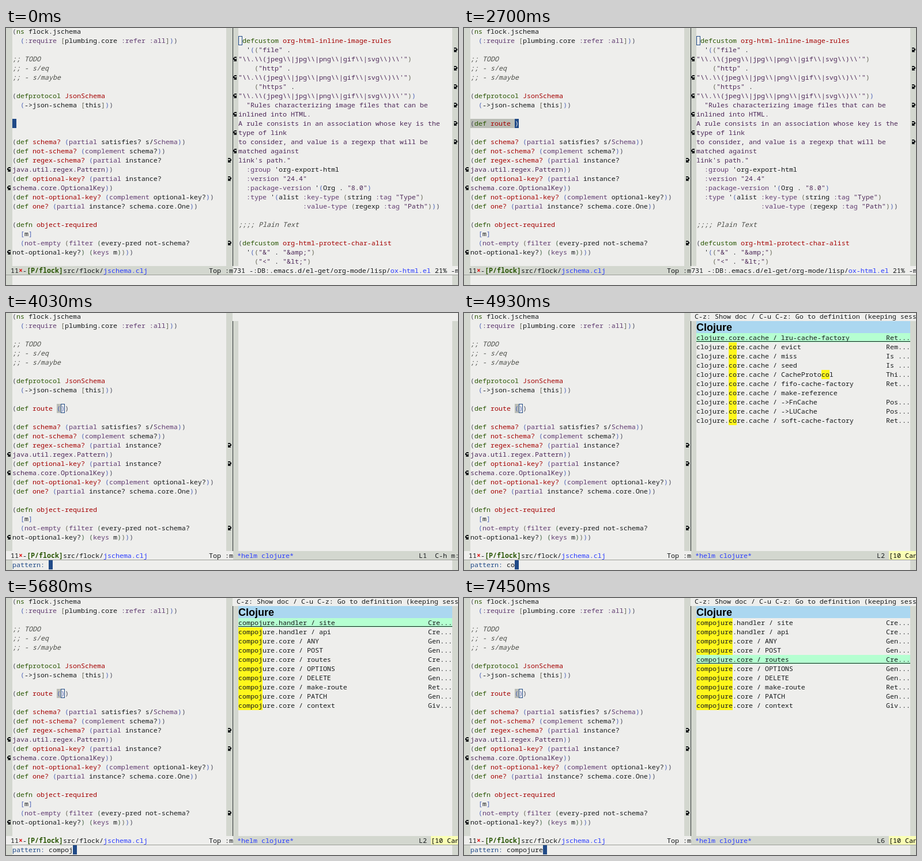
An HTML page that plays this animation: 784x447 px, repeating every 8000 ms.

```html
<!DOCTYPE html>
<html lang="en">
<head>
<meta charset="utf-8">
<title>Editor completion</title>
<style>
  html, body { margin: 0; width: 100%; height: 100%; overflow: hidden; }
  body { position: relative; background: #eeeeec; color: #16191b; }
  body, pre { font: 500 11.6667px/16px "Noto Sans Mono", "DejaVu Sans Mono", monospace; }
  pre { margin: 0; }
  div, pre, svg { position: absolute; white-space: pre; }
  .fringe { background: #d3d7cf; top: 0; height: 447px; }
  .split { left: 393px; width: 1px; height: 414px; background: #2e3436; }
  .bar { top: 414px; height: 16px; background: #eeeeec; overflow: hidden; }
  .bar.active { background: #d3d7cf; }
  .bar::after { content: ""; position: absolute; inset: 0; box-shadow: inset 0 -1px #9a9d97; }
  .cursor { width: 7px; height: 16px; background: #204a87; color: #eeeeec; }
  .hollow { box-sizing: border-box; background: #eeeeec; border: 1px solid #204a87; color: #4f65b8; line-height: 14px; text-indent: -1px; }
  .region { height: 16px; background: #babdb6; }
  .source { left: 403px; top: 14px; width: 371px; height: 21px; background: #abd7f0; color: #000;
            font: bold 18px/22px "Liberation Sans", Arial, sans-serif; }
  .item { left: 403px; width: 371px; height: 16px; }
  .item i { display: inline-block; height: 16px; vertical-align: top; font-style: normal; background: #fff71c; }
  .item span { position: absolute; left: 329px; }
  .on { background: #b5ffd1; box-shadow: inset 0 -1px #b5ffd1, inset 0 -2px #16191b; }
  .count { left: 343px; width: 60px; background: #faffb5; color: #000; }
  .k { color: #2a5604; }
  .f { color: #a40000; }
  .b { color: #5f3a70; }
  .s { color: #4c2858; }
  .c { color: #4c4e49; font-style: italic; }
  .p { color: #204a87; }
  .n { color: #2b3cff; }
  .g { color: #2a5604; font-weight: 600; }
  .x { color: #e01010; font-weight: bold; }
  .d1 { color: #4c4d5c; }
  .d2 { color: #4f65b8; }
  .d3 { color: #666758; }
  .d4 { color: #466646; }
  .d5 { color: #664a4a; }
</style>
</head>
<body>
<div class="fringe" style="left:0;width:11px"></div>
<div class="fringe" style="left:382px;width:11px;height:414px"></div>
<div class="fringe" id="inner" style="left:394px;width:9px;height:414px"></div>
<div class="fringe" id="outer" style="left:774px;width:10px"></div>
<div class="split" id="split"></div>
<pre id="left" style="left:11px;top:-2px"></pre>
<pre id="right" style="left:403px;top:-2px"></pre>
<div id="marks"></div>
<div id="point" class="cursor hollow" style="left:403px;top:14px"></div>
<div id="edit" style="left:11px;top:158px"></div>
<div id="helm"></div>
<div class="bar" id="bar1" style="left:0;width:394px"></div>
<div class="bar" id="bar2" style="left:394px;width:390px"></div>
<div id="mini" style="left:11px;top:430px"></div>

<script>
const LOOP = 8000, CELL = 7, ROW = 16;
const $ = id => document.getElementById(id);

// {kword} gives a word the class k; brackets are coloured by depth.
const leftCode = String.raw`({kns} flock.jschema
  ({b:require} [plumbing.core {b:refer} {b:all}]))

{c;; TODO}
{c;; - s/eq}
{c;; - s/maybe}

({kdefprotocol} {fJsonSchema}
  (->json-schema [this]))



({kdef} {fschema?} ({bpartial} satisfies? s/{bSchema}))
({kdef} {fnot-schema?} ({bcomplement} schema?))
({kdef} {fregex-schema?} ({bpartial} instance?
{sjava.util.regex.Pattern}))
({kdef} {foptional-key?} ({bpartial} instance?
{sschema.core.OptionalKey}))
({kdef} {fnot-optional-key?} ({bcomplement} optional-key?))
({kdef} {fone?} ({bpartial} instance? schema.core.One))

({kdefn} {fobject-required}
  [m]
  ({bnot-empty} ({bfilter} (every-pred not-schema?
not-optional-key?) ({bkeys} m))))`;

const types = String.raw`{s"\\.\\(jpeg\\|jpg\\|png\\|gif\\|svg\\)\\'"}`;
const rightCode = String.raw`
({kdefcustom} {forg-html-inline-image-rules}
  '(({s"file"} .
${types})
    ({s"http"} .
${types})
    ({s"https"} .
${types}))
  {s"Rules characterizing image files that can be}
{sinlined into HTML.}
{sA rule consists in an association whose key is the}
{stype of link}
{sto consider, and value is a regexp that will be}
{smatched against}
{slink's path."}
  {b:group} 'org-export-html
  {b:version} {s"24.4"}
  {b:package-version} '(Org . {s"8.0"})
  {b:type} '(alist {b:key-type} (string {b:tag} {s"Type"})
                {b:value-type} (regexp {b:tag} {s"Path"})))

{c;;;; Plain Text}

({kdefcustom} {forg-html-protect-char-alist}
  '(({s"&"} . {s"&amp;"})
    ({s"<"} . {s"&lt;"})`;

const esc = s => s.replace(/&/g, "&amp;").replace(/</g, "&lt;");

function paint(code) {
  let depth = 0;
  return code.replace(/\{(\w)([^}]*)\}|[()[\]]/g, (m, cls, text) => {
    if (cls) return `<span class="${cls}">${esc(text)}</span>`;
    const d = "([".includes(m) ? ++depth : depth--;
    return `<span class="d${d}">${m}</span>`;
  });
}

// Curly arrows beside wrapped lines
function arrow(x, row, flip) {
  return `<svg width="8" height="8" style="left:${x}px;top:${row * ROW + 2}px">
    <path fill="#16191b" ${flip ? 'transform="matrix(-1 0 0 1 8 0)"' : ""}
    d="M2 0H6V2H2V3H3V4H5V3H6V8H1V7H2V6H1V5H0V2H1V1H2Z"/></svg>`;
}
const wraps = (rows, lx, rx) =>
  rows.map(r => arrow(rx, r, true) + arrow(lx, r + 1, false)).join("");
const leftMarks = wraps([14, 16, 23], 2, 383);
const rightMarks = wraps([2, 4, 6, 8, 10, 12], 394, 775);

const cacheItems = [
  ["lru-cache-factory", "Ret"], ["evict", "Rem"], ["miss", "Is "], ["seed", "Is "],
  ["CacheProtocol", "Thi"], ["fifo-cache-factory", "Ret"], ["make-reference", ""],
  ["->FnCache", "Pos"], ["->LUCache", "Pos"], ["soft-cache-factory", "Ret"]
].map(([name, doc]) => ["clojure.core.cache / " + name, doc]);

const routeItems = [
  ["handler / site", "Cre"], ["handler / api", "Cre"], ["core / ANY", "Gen"],
  ["core / POST", "Gen"], ["core / routes", "Cre"], ["core / OPTIONS", "Gen"],
  ["core / DELETE", "Gen"], ["core / make-route", "Ret"], ["core / PATCH", "Gen"],
  ["core / context", "Giv"]
].map(([name, doc]) => ["compojure." + name, doc]);

// Timelines: [start in ms, value]
const typed = [[0, null], [600, ""], [1350, "d"], [1500, "def"], [1800, "def "],
  [1950, "def r"], [2100, "def ro"], [2250, "def rou"], [2400, "def route"],
  [2700, "def route "], [3140, "def route ()"]];
const inputLen = [[4030, 0], [4780, 1], [4930, 2], [5080, 3], [5230, 4], [5380, 5],
  [5680, 6], [5820, 7], [5970, 8], [6260, 9]];
const matchLen = [[0, 0], [4930, 2], [5080, 3], [5230, 4], [5530, 5],
  [5680, 6], [5820, 7], [5970, 8], [6410, 9]];
const picked = [[0, 0], [7010, 1], [7150, 2], [7300, 3], [7450, 4]];

function at(line, t) {
  let value;
  for (const [start, v] of line) if (start <= t) value = v;
  return value;
}

function put(id, html) {
  const el = $(id);
  if (el.shown !== html) el.innerHTML = el.shown = html;
}

function editHtml(text, hollow) {
  if (text === null) return '<div class="cursor"></div>';
  const nested = text.endsWith("()");
  const col = text.length + (nested ? 0 : 1);
  const from = nested ? col - 1 : 0;
  const code = text.replace(/^def/, "{kdef}").replace(/ (\w+)/, " {f$1}");
  return `<div class="region" style="left:${from * CELL}px;width:${(col - from) * CELL}px"></div>` +
    `<div>${paint(`(${code})`)}</div>` +
    `<div class="cursor${hollow ? " hollow" : ""}" style="left:${col * CELL}px">)</div>`;
}

function helmHtml(query, sel) {
  if (!query) return "";
  const items = query.length < 3 ? cacheItems : routeItems;
  const rows = items.map(([name, doc], i) => {
    const on = i === sel;
    const label = on ? name : name.split(query).join(`<i>${query}</i>`);
    return `<div class="item${on ? " on" : ""}" style="top:${35 + i * ROW}px">` +
      `${label}<span>${doc && doc + "..."}</span></div>`;
  });
  return '<div style="left:400px;top:-2px">C-z: Show doc / C-u C-z: Go to definition (keeping session)</div>' +
    '<div class="source">Clojure</div>' + rows.join("");
}

function helmBar(query, sel) {
  const tail = query
    ? '<div class="count">[10 Candidate(s)]</div>'
    : '<div style="left:350px">C-h m:Help</div>';
  return `<div class="n" style="left:7px">*helm clojure*</div>` +
    `<div style="left:322px">L${query ? sel + 2 : 1}</div>${tail}`;
}

const fileBar = '731 -:DB:.emacs.d/el-get/org-mode/lisp/<span class="n">ox-html.el</span> 21% -m';

function draw(t) {
  const helm = t >= 4030;
  const query = "compojure".slice(0, at(matchLen, t));
  const sel = at(picked, t);
  const top = helm ? "14px" : "0";

  put("edit", editHtml(at(typed, t), t >= 3740));
  put("marks", leftMarks + (helm ? "" : rightMarks));
  put("helm", helmHtml(query, sel));
  put("bar2", helm ? helmBar(query, sel) : fileBar);
  $("bar1").classList.toggle("active", !helm);
  $("bar2").classList.toggle("active", helm);
  for (const id of ["right", "point"]) $(id).style.display = helm ? "none" : "";
  for (const id of ["inner", "outer", "split"]) $(id).style.top = top;
  for (const id of ["inner", "split"]) $(id).style.height = helm ? "400px" : "414px";

  const n = at(inputLen, t);
  put("mini", helm
    ? `<span class="p">pattern: </span>${"compojure".slice(0, n)}` +
      `<div class="cursor" style="top:0;left:${(9 + n) * CELL}px"></div>`
    : "");
}

put("left", paint(leftCode));
put("right", paint(rightCode));
put("bar1", '<div style="left:8px">11<span class="x">×</span>-<span class="g">[P/flock]</span>' +
  'src/flock/<span class="n">jschema.clj</span></div><div style="left:352px">Top :mode</div>');

const begin = performance.now();
function tick() {
  draw((performance.now() - begin) % LOOP);
  requestAnimationFrame(tick);
}
draw(0);
requestAnimationFrame(tick);
</script>
</body>
</html>
```
